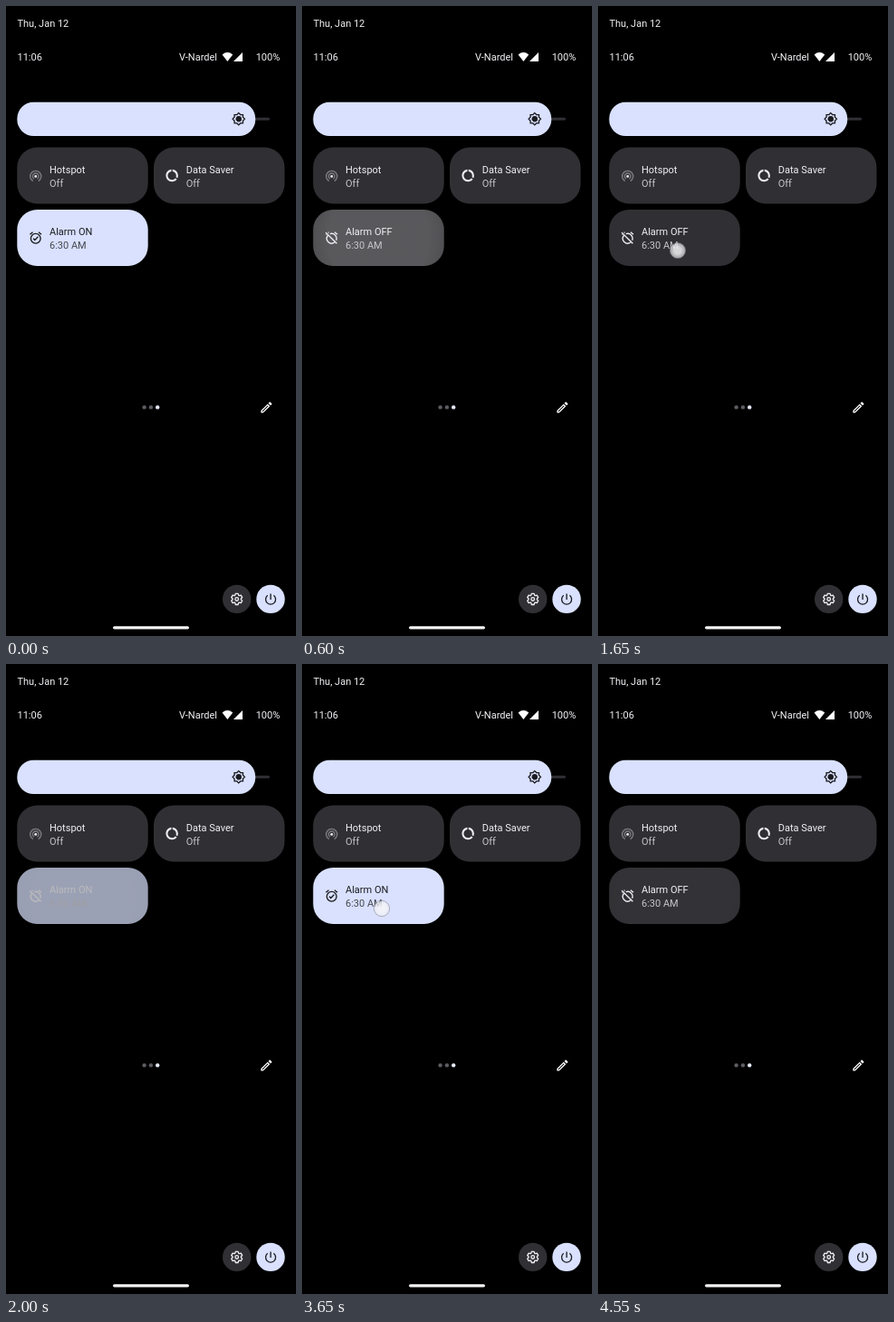
An HTML page that plays this animation: 320 px wide and 693 px high, repeating every 5400 ms.

```html
<!DOCTYPE html>
<html lang="en">
<head>
<meta charset="utf-8">
<title>Quick settings alarm tile</title>
<style>
  html, body { margin: 0; width: 100%; height: 100%; overflow: hidden; background: #000; }
  svg { display: block; }
  text { font: 11px Roboto, sans-serif; fill: #f1f0f4; }
  .sub { fill: #c7c6ca; }
  .line { fill: none; stroke: currentColor; stroke-width: 2; }
</style>
</head>
<body>
<svg width="320" height="693" viewBox="0 0 320 693">
  <defs>
    <clipPath id="tileClip"><rect x="12.3" y="224" width="144.4" height="62" rx="22"/></clipPath>
    <radialGradient id="glow">
      <stop offset=".6" stop-color="#fff"/>
      <stop offset="1" stop-color="#fff" stop-opacity=".55"/>
    </radialGradient>
    <radialGradient id="touch">
      <stop offset=".45" stop-color="#f6f6f8" stop-opacity=".84"/>
      <stop offset="1" stop-color="#f0f0f4" stop-opacity=".58"/>
    </radialGradient>
  </defs>
  <rect width="320" height="693"/>

  <!-- status bar -->
  <text x="12.5" y="23">Thu, Jan 12</text>
  <text x="12.5" y="60">11:06</text>
  <text x="191" y="60">V-Nardel</text>
  <path d="M238.6 53.4Q244.4 48.8 250.2 53.4L244.4 61Z" fill="#fff"/>
  <path d="M261 51V61H251Z" fill="#fff"/>
  <text x="275.7" y="60">100%</text>

  <!-- brightness -->
  <rect x="260" y="122.7" width="31" height="3" rx="1.5" fill="#303034"/>
  <rect x="12.3" y="105.7" width="262.9" height="37.4" rx="18.2" fill="#d9e1ff"/>
  <g transform="translate(248.7 116.2) scale(.67)" color="#1b1b1f">
    <path class="line" d="M12 2.1 14.9 5H19V9.1L21.9 12 19 14.9V19H14.9L12 21.9 9.1 19H5V14.9L2.1 12 5 9.1V5H9.1Z"/>
    <circle cx="12" cy="12" r="4.8" fill="currentColor"/>
  </g>

  <!-- tiles -->
  <rect x="12.3" y="155.5" width="144.4" height="62" rx="22" fill="#303034"/>
  <g transform="translate(24.7 178.7) scale(.67)" color="#7d7c81">
    <path class="line" stroke-width="1.8" d="M7.5 20.8A9 9 0 1 1 16.5 20.8M9.5 17.3A5 5 0 1 1 14.5 17.3"/>
    <circle cx="12" cy="13" r="2.1" fill="#f1f0f4"/>
  </g>
  <text x="48" y="183.5">Hotspot</text>
  <text class="sub" x="48" y="198.6">Off</text>

  <rect x="163" y="155.5" width="144.4" height="62" rx="22" fill="#303034"/>
  <path transform="translate(175.1 178.5) scale(.67)" fill="#f1f0f4" d="M13 2.05v3.03c3.39.49 6 3.39 6 6.92 0 .9-.18 1.75-.48 2.54l2.6 1.53c.56-1.24.88-2.62.88-4.07 0-5.18-3.95-9.45-9-9.95zM12 19c-3.87 0-7-3.13-7-7 0-3.53 2.61-6.43 6-6.92V2.05c-5.06.5-9 4.76-9 9.95 0 5.52 4.47 10 9.99 10 3.31 0 6.24-1.61 8.06-4.09l-2.6-1.53C16.17 17.98 14.21 19 12 19z"/>
  <text x="198.7" y="183.5">Data Saver</text>
  <text class="sub" x="198.7" y="198.6">Off</text>

  <rect id="tile" x="12.3" y="224" width="144.4" height="62" rx="22"/>
  <g clip-path="url(#tileClip)"><circle id="ripple" fill="url(#glow)"/></g>
  <g id="icon" transform="translate(24.7 247) scale(.67)">
    <path id="iconOn" class="line" d="M20 13A8 8 0 1 1 4 13A8 8 0 1 1 20 13M2.6 6.5 7.2 2.6M16.8 2.6 21.4 6.5M7.9 12.9 10.5 15.6 16 10.1"/>
    <path id="iconOff" class="line" d="M9.2 5.5A8 8 0 0 1 19.4 16M16.8 19.4A8 8 0 0 1 5.6 8.2M2.2 3.2 20.4 21.4M2.6 6.5 4 5.3M6 3.6 7.2 2.6M16.8 2.6 21.4 6.5"/>
  </g>
  <text id="label" x="48" y="251.8"></text>
  <text id="time" x="48" y="267">6:30 AM</text>
  <circle id="dot" cx="88" cy="269" r="8.6" fill="url(#touch)" stroke="#77777d" stroke-opacity=".5"/>

  <!-- pager and edit -->
  <circle cx="152.6" cy="441.4" r="2.2" fill="#5d5d62"/>
  <circle cx="159.9" cy="441.4" r="2.2" fill="#5d5d62"/>
  <circle cx="167.2" cy="441.4" r="2.2" fill="#e4e8fb"/>
  <path transform="translate(279.3 433.5) scale(.67)" fill="#fff" d="M14.06 9.02l.92.92L5.92 19H5v-.92l9.06-9.06M17.66 3c-.25 0-.51.1-.7.29l-1.83 1.83 3.75 3.75 1.83-1.83c.39-.39.39-1.02 0-1.41l-2.34-2.34c-.2-.2-.45-.29-.71-.29zm-3.6 3.19L3 17.25V21h3.75L17.81 9.94l-3.75-3.75z"/>

  <!-- footer -->
  <circle cx="254.7" cy="652.4" r="15.7" fill="#303034"/>
  <g transform="translate(254.7 652.4) scale(.67)" color="#f1f0f4">
    <path id="gear" class="line" stroke-linejoin="round"/>
    <circle class="line" r="2.7"/>
  </g>
  <circle cx="292" cy="652.4" r="15.7" fill="#d9e1ff"/>
  <path transform="translate(284 644.4) scale(.67)" color="#1b1b1f" class="line" d="M12 3V13M7 5.8A8.2 8.2 0 1 0 17 5.8"/>
  <rect x="118" y="682.2" width="84" height="3.2" rx="1.6" fill="#f4f4f4"/>
</svg>
<script>
  const LOOP = 5400, STEP = 50;
  const TAPS = [
    { at: 50, on: false, hold: 150, glow: .2 },
    { at: 1650, on: true, hold: 200, glow: .04 },
    { at: 3650, on: false, hold: 150, glow: .2 }
  ];
  const TURN = 190, TURN_MS = 350;
  const GLOW = 75, GLOW_IN = 450, GLOW_OUT = 350;
  const OFF = { tile: [48, 48, 52], label: [241, 240, 244], time: [199, 198, 202] };
  const ON = { tile: [217, 225, 255], label: [27, 27, 31], time: [68, 71, 79] };

  const $ = id => document.getElementById(id);
  const clamp = x => Math.min(1, Math.max(0, x));
  const ease = x => (1 - Math.cos(Math.PI * x)) / 2;
  const set = (id, attrs) => {
    for (const name in attrs) $(id).setAttribute(name, attrs[name]);
  };

  // Colours blend in linear light.
  const blend = (a, b, p) => 'rgb(' + a.map((v, i) =>
    Math.round(Math.pow(Math.pow(v, 2.2) * (1 - p) + Math.pow(b[i], 2.2) * p, 1 / 2.2))) + ')';

  const gearPath = () => {
    const points = [];
    for (let tooth = 0; tooth < 6; tooth++) {
      for (const [turn, r] of [[-24, 7], [-13, 9.3], [13, 9.3], [24, 7]]) {
        const a = (tooth * 60 + turn - 90) * Math.PI / 180;
        points.push((r * Math.cos(a)).toFixed(2) + ' ' + (r * Math.sin(a)).toFixed(2));
      }
    }
    return 'M' + points.join('L') + 'Z';
  };

  // The screen refreshes in steps and rests for longer in a few places.
  const snap = t => {
    if (t >= 600 && t < 900) return t < 750 ? 600 : 750;
    if (t >= 900 && t < 1650) return 900;
    if (t >= 2250 && t < 2500) return 2250;
    return Math.floor(t / STEP) * STEP;
  };

  function draw(now) {
    const t = snap(now % LOOP);
    const tap = TAPS.filter(x => x.at <= t).pop() || { at: LOOP, on: false, hold: 0, glow: 0 };
    const age = t - tap.at;
    const p = ease(clamp((age - TURN) / TURN_MS));
    const level = tap.on ? p : 1 - p;

    set('tile', { fill: blend(OFF.tile, ON.tile, level) });
    set('label', { style: 'fill:' + blend(OFF.label, ON.label, level) });
    set('time', { style: 'fill:' + blend(OFF.time, ON.time, level) });
    set('icon', { color: blend(OFF.label, ON.label, level) });

    const named = age >= TURN ? tap.on : !tap.on;
    const text = 'Alarm ' + (named ? 'ON' : 'OFF');
    if ($('label').textContent !== text) $('label').textContent = text;

    const drawn = p === 1 ? tap.on : !tap.on;
    set('iconOn', { visibility: drawn ? 'visible' : 'hidden' });
    set('iconOff', { visibility: drawn ? 'hidden' : 'visible' });

    const grow = clamp((age - GLOW) / GLOW_IN);
    const spread = 1 - (1 - grow) ** 2;
    const fade = Math.max(.07, 1 - clamp((age - GLOW - GLOW_IN - 25) / GLOW_OUT));
    set('ripple', {
      cx: 88 - 3.5 * spread,
      cy: 269 - 14 * spread,
      r: 92 * spread,
      opacity: tap.glow * fade * Math.min(1, grow * 3)
    });

    set('dot', { visibility: age >= 0 && age < tap.hold ? 'visible' : 'hidden' });
  }

  function tick(now) {
    draw(now);
    requestAnimationFrame(tick);
  }

  set('gear', { d: gearPath() });
  draw(0);
  requestAnimationFrame(tick);
</script>
</body>
</html>
```
